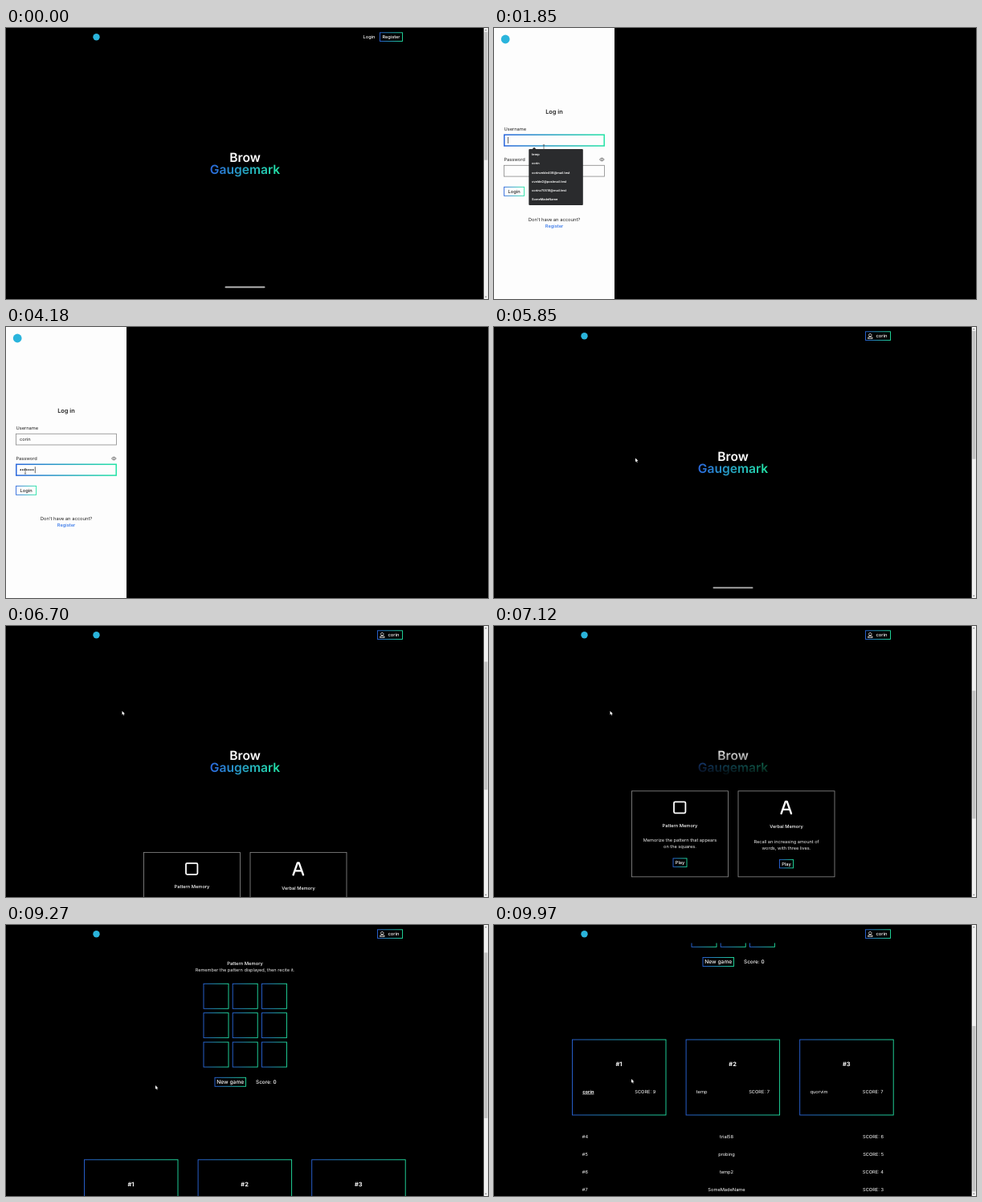
An HTML page with a canvas that plays this animation: 600x338 px, repeating every 10000 ms.

```html
<!DOCTYPE html>
<html lang="en">
<head>
<meta charset="utf-8">
<title>Brow Gaugemark</title>
<style>
  html, body { margin: 0; width: 100%; height: 100%; overflow: hidden; background: #000; }
  canvas { display: block; }
</style>
</head>
<body>
<canvas id="stage" width="600" height="338"></canvas>
<script>
const ctx = document.getElementById('stage').getContext('2d');
const W = 600, H = 338, LOOP = 10000;
const BLUE = '#2a66dc', GREEN = '#22e3a4', LOGO = '#2ab4dc';
const USER = 'corin';

// Times (ms) at which the visible page or form state changes
const T = { login: 1110, focusUser: 1680, pick: 2150, focusPass: 2380, home: 4680, game: 8000 };
const KEYS = [2720, 2840, 3020, 3110, 3200, 3300, 3410];

const cursorPath = [
  [0, 470, 120], [700, 452, 12], [1120, 452, 12], [1650, 62, 149], [1900, 62, 149],
  [2120, 54, 170], [2180, 54, 170], [2380, 24, 180], [4250, 24, 180], [4500, 25, 204],
  [4700, 25, 204], [5600, 176, 163.5], [6300, 176, 163.5], [6700, 144.5, 106],
  [7150, 144.5, 106], [7700, 231, 236], [8050, 231, 236], [8900, 186, 200],
  [9400, 186, 200], [9900, 171, 192]
];
const homeScroll = [[6320, 0], [6670, 78], [7120, 160], [7500, 220]];
const gameScroll = [[9060, 0], [9270, 48], [9970, 198]];

const smooth = p => p * p * (3 - 2 * p);

function along(path, t, ease = smooth) {
  if (t <= path[0][0]) return path[0].slice(1);
  for (let i = 1; i < path.length; i++) {
    const [t0, ...a] = path[i - 1], [t1, ...b] = path[i];
    if (t < t1) {
      const p = ease((t - t0) / (t1 - t0));
      return a.map((v, k) => v + (b[k] - v) * p);
    }
  }
  return path[path.length - 1].slice(1);
}

function blend(x0, x1) {
  const g = ctx.createLinearGradient(x0, 0, x1, 0);
  g.addColorStop(0, BLUE);
  g.addColorStop(1, GREEN);
  return g;
}

function fill(x, y, w, h, color) {
  ctx.fillStyle = color;
  ctx.fillRect(x, y, w, h);
}

function box(x, y, w, h, color = blend(x, x + w), line = 0.9) {
  ctx.strokeStyle = color;
  ctx.lineWidth = line;
  ctx.strokeRect(x, y, w, h);
}

function text(str, x, y, size = 5.4, { weight = 400, align = 'left', color = '#fff' } = {}) {
  ctx.font = `${weight} ${size}px Inter, sans-serif`;
  ctx.textRendering = 'geometricPrecision';
  ctx.textAlign = align;
  ctx.fillStyle = color;
  ctx.fillText(str, x, y);
}

function center(str, x, y, size, weight, color) {
  text(str, x, y, size, { weight, align: 'center', color });
}

function disc(x, y, r, color) {
  ctx.fillStyle = color;
  ctx.beginPath();
  ctx.arc(x, y, r, 0, 7);
  ctx.fill();
}

function stroke(path, color, line) {
  ctx.strokeStyle = color;
  ctx.lineWidth = line;
  ctx.stroke(new Path2D(path));
}

function button(label, x, y, w, h, size, color) {
  box(x, y, w, h);
  center(label, x + w / 2, y + h / 2 + size * 0.36, size, 500, color);
}

function nav(signedIn) {
  disc(112.5, 11.3, 4.2, LOGO);
  if (signedIn) {
    box(462.5, 5.8, 31, 10.7);
    stroke('M468.3 8.4a1.7 1.7 0 1 0 .01 0zM465.5 14.4v-.6q0-1.3 1.5-1.3h2.6q1.5 0 1.5 1.3v.6z', '#fff', 0.8);
    text(USER, 475.5, 13.2, 5.8, { weight: 500 });
  } else {
    text('Login', 444.6, 13.2, 5.6, { weight: 500 });
    button('Register', 465.5, 5.8, 28, 10.7, 5.6);
  }
}

function scrollbar(scroll, pageHeight) {
  const scale = 327.4 / pageHeight;
  fill(594.7, 0, 5.3, H, '#f1f1f1');
  fill(595.4, 5 + scroll * scale, 4, H * scale, '#c1c1c1');
  ctx.fillStyle = '#666';
  ctx.fill(new Path2D('M596.1 3.2l1.2-1.4 1.2 1.4zM596.1 334.8l1.2 1.4 1.2-1.4z'));
}

function gameCard(x, y, title, lines) {
  box(x, y, 120, 107, '#8f8f8f', 0.8);
  const mid = x + 60, top = title[0] === 'V' ? y + 1.5 : y;
  center(title, mid, top + 45, 5.7, 500);
  lines.forEach((line, i) => center(line, mid, top + 63.2 + i * 8.3, 5.6, 400, '#eee'));
  button('Play', mid - 8.5, top + 84, 17, 10.5, 5.7);
}

function drawHome(t, signedIn) {
  const scroll = along(homeScroll, t, p => p)[0];
  center('Brow', 297.5, 167, 15.6, 600);
  center('Gaugemark', 297.5, 181.8, 15.6, 600, blend(253, 342));
  const age = signedIn ? t - T.home : t;
  ctx.fillStyle = '#fff';
  ctx.beginPath();
  ctx.roundRect(272.5, 324 - 1.7 * Math.cos(age / 1600 * 2 * Math.PI), 50, 2, 1);
  ctx.fill();

  // The next section fades in over the fixed title
  const shade = ctx.createLinearGradient(0, 312 - scroll, 0, 348 - scroll);
  shade.addColorStop(0, 'rgba(0,0,0,0)');
  shade.addColorStop(1, '#000');
  fill(0, 312 - scroll, W, H + scroll, shade);

  const y = 366 - scroll;
  gameCard(171.5, y, 'Pattern Memory', ['Memorize the pattern that appears', 'on the squares.']);
  gameCard(304, y, 'Verbal Memory', ['Recall an increasing amount of', 'words, with three lives.']);
  ctx.strokeStyle = '#fff';
  ctx.lineWidth = 1.8;
  ctx.beginPath();
  ctx.roundRect(224, y + 13.5, 14.4, 14, 1.5);
  ctx.stroke();
  ctx.lineCap = ctx.lineJoin = 'round';
  stroke(`M357.6 ${y + 28}L362.9 ${y + 13}h1.8L370 ${y + 28}M359.6 ${y + 23}h8.4`, '#fff', 2.4);
  ctx.lineCap = 'butt';
  ctx.lineJoin = 'miter';

  nav(signedIn);
  scrollbar(scroll, 693);
}

function drawGame(t) {
  const scroll = along(gameScroll, t, p => p)[0];
  ctx.save();
  ctx.translate(0, -scroll);
  center('Pattern Memory', 297.5, 98.2, 5.8, 500);
  center('Remember the pattern displayed, then recite it.', 297.5, 106.3, 5.6, 400, '#eee');
  for (let i = 0; i < 9; i++) box(246 + i % 3 * 36.2, 121.5 + (i / 3 | 0) * 36.4, 31, 31);
  button('New game', 260, 238.5, 38.5, 11, 6.7);
  text('Score: 0', 311, 246.3, 6.4, { weight: 500 });

  [[USER, 9], ['temp', 7], ['quorvim', 7]].forEach(([name, score], i) => {
    const x = 97.5 + i * 141.6;
    box(x, 341, 116.5, 94);
    center('#' + (i + 1), x + 58, 373.8, 7.4, 700);
    text(name, x + 12.7, 407.6, 5.7, { weight: i ? 400 : 700 });
    if (!i) fill(x + 12.7, 408.6, ctx.measureText(name).width, 0.7, '#fff');
    text('SCORE: ' + score, x + 103.8, 407.6, 5.7, { align: 'right' });
  });
  ['trial58', 'probing', 'temp2', 'SomeMadeName'].forEach((name, i) => {
    const y = 463.8 + i * 22;
    text('#' + (i + 4), 109.8, y, 5.7);
    center(name, 289.5, y, 5.7, 400);
    text('SCORE: ' + (6 - i), 485, y, 5.7, { align: 'right' });
  });
  ctx.restore();
  fill(0, 0, W, 22.5, '#000');
  nav(true);
  scrollbar(scroll, 536);
}

function field(y, focused) {
  if (focused) box(12.8, y, 124.4, 13.8, blend(12, 138), 1.5);
  else box(12.5, y, 125, 13.8, '#888', 0.8);
}

function drawLogin(t) {
  const ink = '#222', dark = { color: ink };
  const onUser = t >= T.focusUser && t < T.focusPass, onPass = t >= T.focusPass;
  fill(0, 0, 150, H, '#fdfdfd');
  disc(14.2, 14, 5.4, LOGO);
  center('Log in', 75, 106.7, 7.4, 600, ink);
  text('Username', 12.4, 127.8, 5.7, dark);
  field(133.2, onUser);
  text('Password', 12.4, 165.7, 5.7, dark);
  stroke('M131.3 164q3-3.8 6 0q-3 3.8-6 0zM134.3 162.8a1.2 1.2 0 1 0 .01 0z', '#444', 0.6);
  field(171.3, onPass);
  button('Login', 12.6, 198.3, 25, 11, 5.7, ink);
  center("Don't have an account?", 75, 241, 5.8, 400, ink);
  center('Register', 75, 249, 5.7, 500, '#2f72e8');

  if (t >= T.pick) text(USER, 17, 142, 5.7, dark);
  const userEnd = 17.3 + (t >= T.pick ? ctx.measureText(USER).width : 0);
  const dots = KEYS.filter(k => t >= k).length;
  for (let i = 0; i < dots; i++) disc(18.3 + i * 2.55, 178.2, 0.85, ink);
  if (onUser) fill(userEnd, 136, 0.7, 8, ink);
  if (onPass) fill(17.3 + dots * 2.65, 174.3, 0.7, 8, ink);

  if (t >= T.focusUser && t < T.pick) {
    ctx.fillStyle = '#2a2b2d';
    ctx.beginPath();
    ctx.roundRect(43.3, 151, 67.5, 70, 1);
    ctx.fill();
    ctx.fill(new Path2D('M47.5 151.2l2.5-2.4 2.5 2.4z'));
    ['temp', USER, 'corinvelde408@mail.test', 'cvelde2@postmail.test', 'corinv70518@mail.test', 'SomeMadeName']
      .forEach((item, i) => text(item, 47, 159.2 + i * 11.25, 3.9, { weight: 600 }));
  }
}

function drawCursor(t, onLogin) {
  const [x, y] = along(cursorPath, t);
  ctx.save();
  ctx.translate(x, y);
  if (onLogin && (y >= 133 && y < 150 || y >= 171 && y < 185)) {
    stroke('M-1.2 -3.2h2.4M0 -3.2v6.2M-1.2 3h2.4', '#333', 0.6);
  } else {
    const arrow = 'M0 0v4.8l1.1-1 .8 1.8.8-.4-.8-1.7h1.6z';
    stroke(arrow, '#000', 0.7);
    ctx.fillStyle = '#fff';
    ctx.fill(new Path2D(arrow));
  }
  ctx.restore();
}

function draw(t) {
  const onLogin = t >= T.login && t < T.home;
  fill(0, 0, W, H, '#000');
  if (onLogin) drawLogin(t);
  else if (t >= T.game) drawGame(t);
  else drawHome(t, t >= T.home);
  if (t >= 60) drawCursor(t, onLogin);
}

function tick() {
  draw(performance.now() % LOOP);
  requestAnimationFrame(tick);
}
tick();
</script>
</body>
</html>
```
